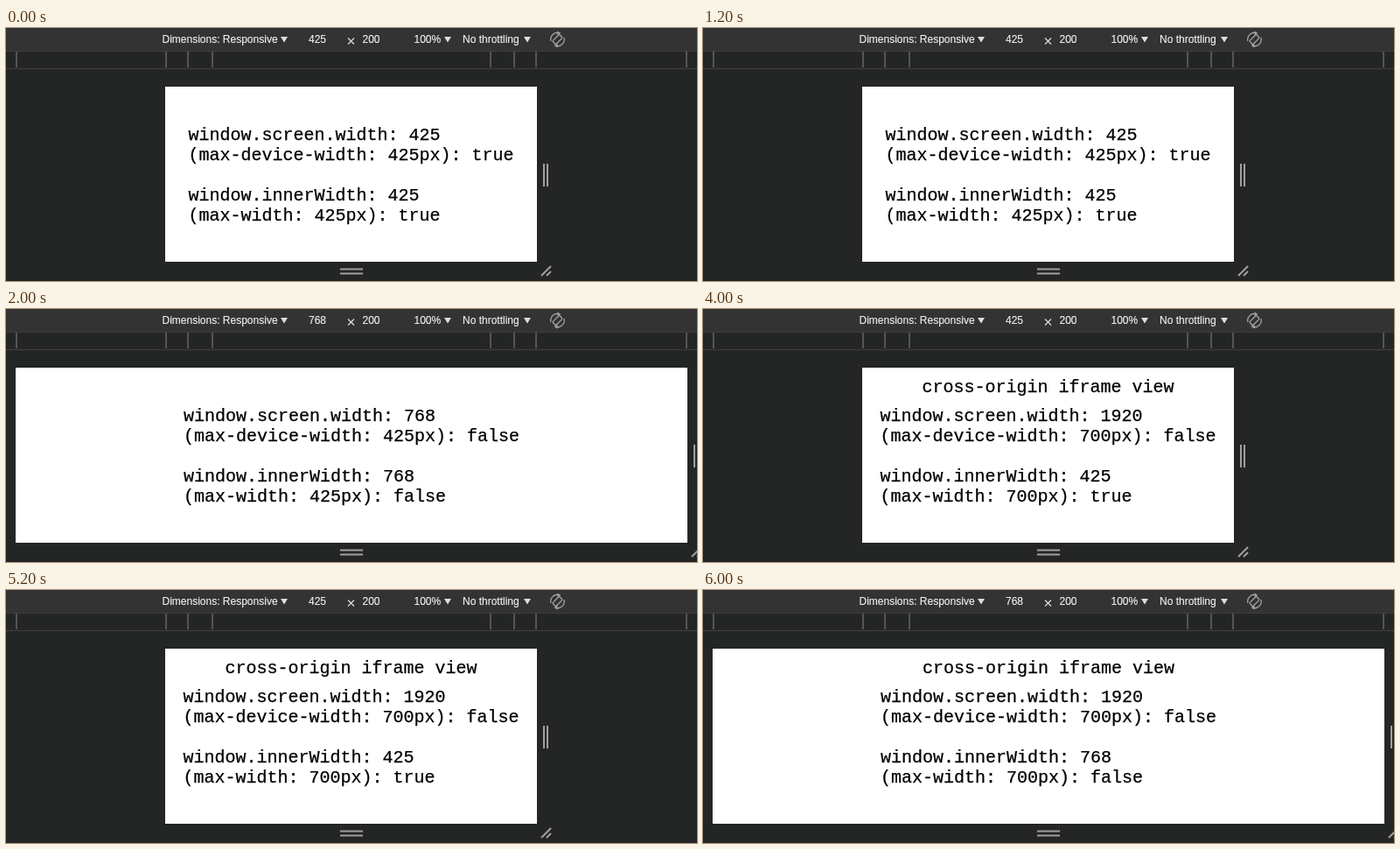
Write an HTML page that moves like this. It is 790x289 px and loops after 8000 ms.

```html
<!DOCTYPE html>
<html lang="en">
<head>
<meta charset="utf-8">
<title>Responsive viewport</title>
<style>
html, body { margin: 0; width: 100%; height: 100%; overflow: hidden; background: #242525; }
svg { display: block; }
.bar text { font: 12px "Liberation Sans", Arial, sans-serif; fill: #f1f1f1; stroke: #f1f1f1; stroke-width: .15px; }
.page text { font: 20px "Liberation Mono", "Courier New", monospace; fill: #000; stroke: #000; stroke-width: .25px; }
.grip { stroke: #a0a0a0; stroke-width: 2; fill: none; }
</style>
</head>
<body>
<svg width="790" height="289" viewBox="0 0 790 289">
  <rect width="790" height="289" fill="#242525"/>
  <g class="bar">
    <rect width="790" height="26" fill="#333"/>
    <rect y="26" width="790" height="1" fill="#3e3e3e"/>
    <rect y="46" width="790" height="1" fill="#414141"/>
    <path id="ticks" stroke="#555" stroke-width="2"/>
    <text x="178.5" y="17">Dimensions: Responsive</text>
    <text id="size" x="346" y="17"></text>
    <path d="M391 11.5l7 7m0-7l-7 7" stroke="#ddd" stroke-width="1.2"/>
    <text x="407.5" y="17">200</text>
    <text x="466.5" y="17">100%</text>
    <text x="522" y="17">No throttling</text>
    <path d="M314 10h8l-4 6.5zM501 10h8l-4 6.5zM592 10h8l-4 6.5z" fill="#ddd"/>
    <g transform="translate(630.5 13)" fill="none" stroke="#a5a5a5" stroke-width="1.3">
      <rect x="-2.7" y="-5.5" width="5.4" height="11" rx="1.2" transform="rotate(45)"/>
      <path d="M-7.5 2A7.8 7.8 0 0 1 1-7.7M7.5-2A7.8 7.8 0 0 1-1 7.7"/>
      <path d="M0-9.5L4-7L0-5zM0 9.5L-4 7L0 5z" fill="#a5a5a5" stroke="none"/>
    </g>
  </g>
  <g class="page">
    <rect id="sheet" y="67" height="200" fill="#fff"/>
    <text id="title" y="95"></text>
    <text y="128" class="row"></text>
    <text y="151" class="row"></text>
    <text y="197" class="row"></text>
    <text y="220" class="row"></text>
  </g>
  <path class="grip" d="M382 275.5h26M382 280.5h26"/>
  <g id="grips" class="grip">
    <path d="M8 155v26M12 155v26"/>
    <path d="M5 283l11-11M11 283l5-5"/>
  </g>
</svg>
<script>
const STEP = 2000, CHAR = 12;
const FRAMED = "cross-origin iframe view";
const scenes = [
  { size: 425, screen: 425, limit: 425, title: "" },
  { size: 768, screen: 768, limit: 425, title: "" },
  { size: 425, screen: 1920, limit: 700, title: FRAMED },
  { size: 768, screen: 1920, limit: 700, title: FRAMED }
];
const $ = id => document.getElementById(id);
const rows = document.querySelectorAll(".row");

$("ticks").setAttribute("d",
  [12, 183, 208, 236, 554, 581, 606, 778].map(x => `M${x} 27v18`).join(""));

function show({ size, screen, limit, title }) {
  const left = size === 425 ? 182 : 11;
  const mid = left + size / 2;
  const lines = [
    `window.screen.width: ${screen}`,
    `(max-device-width: ${limit}px): ${screen <= limit}`,
    `window.innerWidth: ${size}`,
    `(max-width: ${limit}px): ${size <= limit}`
  ];
  const start = mid - lines[1].length * CHAR / 2;
  rows.forEach((row, i) => {
    row.textContent = lines[i];
    row.setAttribute("x", start);
  });
  $("title").textContent = title;
  $("title").setAttribute("x", mid - title.length * CHAR / 2);
  $("size").textContent = size;
  $("sheet").setAttribute("x", left);
  $("sheet").setAttribute("width", size);
  $("grips").setAttribute("transform", `translate(${left + size})`);
}

const begin = performance.now();
let current = -1;
function tick() {
  const i = Math.floor((performance.now() - begin) / STEP) % scenes.length;
  if (i !== current) show(scenes[current = i]);
  requestAnimationFrame(tick);
}
tick();
</script>
</body>
</html>
```
